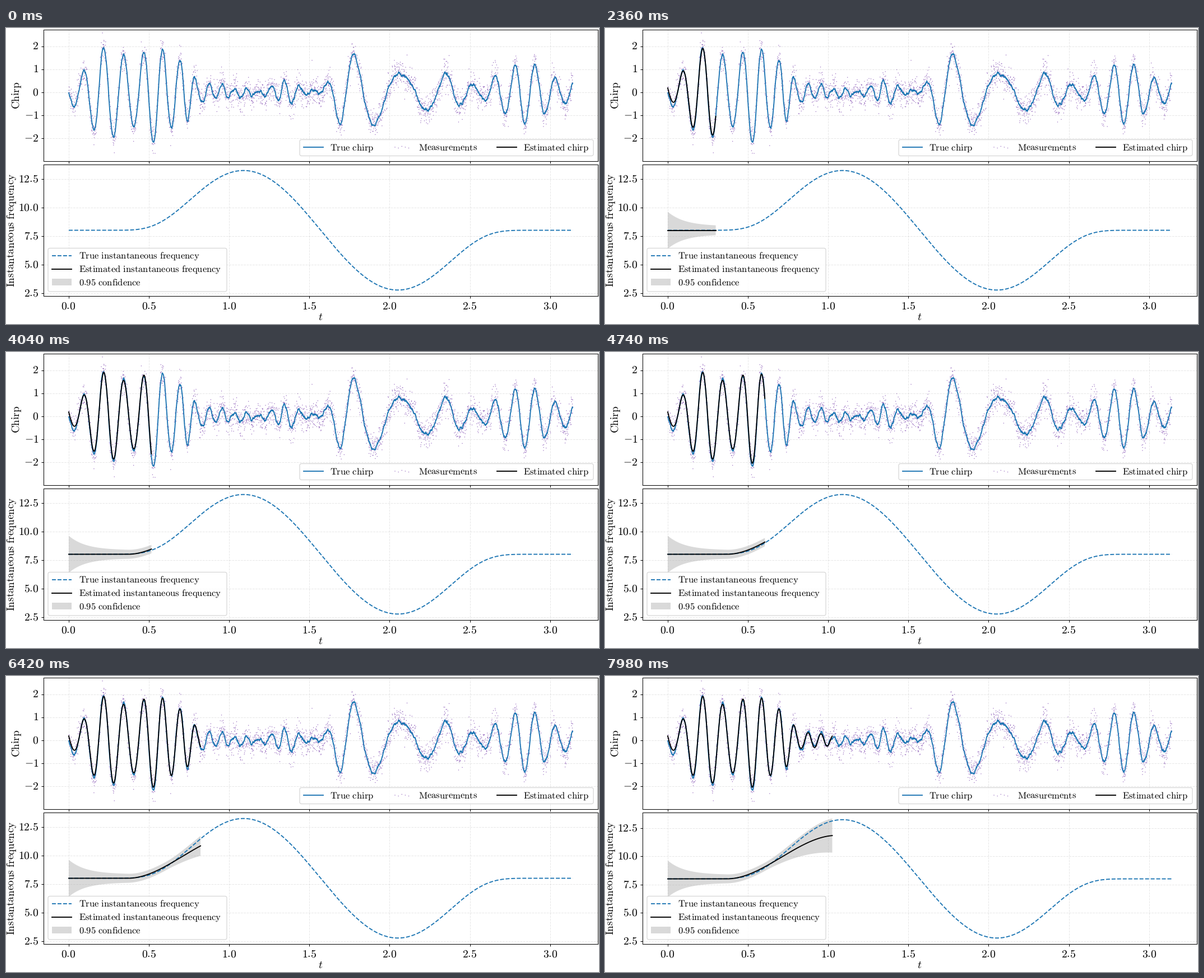
Write a matplotlib script that moves like this. It is 1058 by 529 pixels and loops after 8000 ms.

```python
import matplotlib.pyplot as plt
import numpy as np
from matplotlib.animation import FuncAnimation
from matplotlib.patches import FancyBboxPatch, Rectangle

W, H, DPI = 1058, 529, 100
PX = 72 / DPI                      # points per pixel
LEFT, RIGHT = 67, 1056
LINE, THIN = 1.88 * PX, .99 * PX
TICK_SIZE, LABEL_SIZE, LEGEND_SIZE = 19.7 * PX, 19.1 * PX, 16.6 * PX
BLUE, PURPLE, BLACK = "tab:blue", "tab:purple", "black"

plt.rcParams.update({"mathtext.fontset": "cm", "text.hinting": "none"})
rng = np.random.default_rng(7)


def smoothstep(x, start, end):
    s = np.clip((x - start) / (end - start), 0, 1)
    return s * s * (3 - 2 * s)


def eased(x, keys):
    """Ease from one (position, value) key to the next."""
    moves = zip(keys, keys[1:])
    return keys[0][1] + sum((y1 - y0) * smoothstep(x, x0, x1)
                            for (x0, y0), (x1, y1) in moves)


def jitter(size, sigma=.055, memory=.94):
    kicks = rng.normal(0, sigma * np.sqrt(1 - memory ** 2), size)
    out = np.zeros(size)
    for i in range(1, size):
        out[i] = memory * out[i - 1] + kicks[i]
    return out


def true_frequency(time):
    u = np.pi / 2 - time
    q = np.maximum(np.pi ** 2 / 4 - u ** 2, 1e-3)
    return 8 + 11.303 * np.sin(u) * np.exp(9.93 * (.2991 - q ** -1.5))


# The signal is a sine of the running phase under a wandering amplitude
AMPLITUDE = [(0, -.4), (.24, -2), (.4, -1.45), (.52, -2.1), (.7, -1.4),
             (.84, -.35), (1.2, -.12), (1.36, -.52), (1.53, 0), (1.76, 1.65),
             (1.88, 1.5), (2.12, .7), (2.34, .82), (2.54, .32), (2.86, 1.3),
             (3.08, .55)]

t = np.arange(1, 3142) / 1000
freq = true_frequency(t)
phase = 2 * np.pi * np.cumsum(freq) / 1000
clean = eased(t, AMPLITUDE) * np.sin(phase)
chirp = clean + jitter(len(t))
measured = chirp + rng.normal(0, .31, len(t))

chirp_estimate = .97 * clean + .22 * np.exp(-t / .02)
freq_estimate = 8 + 3.84 * smoothstep(t, .37, 1.05)
half_width = .36 + 1.275 * np.exp(-t / .105) + 1.22 * smoothstep(t, .6, 1.1)
lower, upper = freq_estimate - half_width, freq_estimate + half_width

fig = plt.figure(figsize=(W / DPI, H / DPI), dpi=DPI, facecolor="white")


def panel(top, bottom, yticks, y_format, x_labels):
    width, height = RIGHT - LEFT, bottom - top
    ax = fig.add_axes([LEFT / W, 1 - bottom / H, width / W, height / H])
    ax.set(xticks=[], yticks=[], xlim=(t[0] - .157, t[-1] + .157),
           ylim=(0, 1))
    for spine in ax.spines.values():
        spine.set_linewidth(THIN)
    across, along = ax.get_yaxis_transform(), ax.get_xaxis_transform()
    xticks = np.arange(0, 3.1, .5)
    grid = dict(colors="#b0b0b0", alpha=.3, linestyles="--",
                linewidths=THIN, zorder=1.5)
    ax.vlines(xticks, 0, 1, transform=along, **grid)
    ax.hlines(yticks, 0, 1, transform=across, **grid)
    tick = dict(ls="none", color=BLACK, ms=4.4 * PX, mew=THIN, clip_on=False)
    ax.plot(xticks, 0 * xticks, marker=3, transform=along, **tick)
    ax.plot([0] * len(yticks), yticks, marker=0, transform=across, **tick)
    for v in yticks:
        ax.text(-8.75 / width, v, f"${v:{y_format}}$", ha="right",
                va="center", size=TICK_SIZE, transform=across)
    for v in xticks if x_labels else []:
        ax.text(v, -8.5 / height, f"${v:.1f}$", ha="center", va="top",
                size=TICK_SIZE, transform=along)
    return ax


top = panel(3, 238, range(-2, 3), ".0f", False)
top.set_ylim(-2.985, 2.72)
top.scatter(t, measured, s=1, c=PURPLE, edgecolors="none")
top.plot(t, chirp, color=BLUE, lw=LINE)
chirp_line, = top.plot([], [], color=BLACK, lw=LINE)

low = panel(244, 479, np.arange(2.5, 13, 2.5), ".1f", True)
band, = low.fill([0, 0], [8, 8], color=BLACK, alpha=.15, lw=0)
low.plot(t, freq, color=BLUE, lw=LINE, ls="--")
freq_line, = low.plot([], [], color=BLACK, lw=LINE)

# Labels and legends, in stage pixels
stage = fig.add_axes([0, 0, 1, 1], facecolor="none")
stage.set(xlim=(0, W), ylim=(H, 0))
stage.axis("off")


def roman(s):
    return r"$\mathrm{" + s.replace(" ", r"\ ") + "}$"


def legend_box(x0, y0, x1, y1):
    stage.add_patch(FancyBboxPatch(
        (x0, y0), x1 - x0, y1 - y0, boxstyle="round,pad=0,rounding_size=3.5",
        fc="white", ec="#cccccc", alpha=.8, lw=1.25 * PX))


def legend_line(x, y, color, ls="-"):
    stage.plot([x, x + 35], [y, y], color=color, lw=LINE, ls=ls)


def legend_text(x, y, s):
    stage.text(x, y, roman(s), size=LEGEND_SIZE, va="baseline")


def side_label(x, y, s):
    stage.text(x, y, roman(s), size=LABEL_SIZE, rotation=90, ha="center",
               va="baseline", rotation_mode="anchor")


legend_box(524, 199.5, 1048, 228.5)
legend_line(531, 213, BLUE)
legend_text(578, 218.7, "True chirp")
stage.scatter(np.linspace(694, 718.5, 5), [213, 214.5, 211.5, 213, 214.5],
              s=1, c=PURPLE, edgecolors="none")
legend_text(736.5, 218.7, "Measurements")
legend_line(875.5, 213, BLACK)
legend_text(923, 218.7, "Estimated chirp")

legend_box(75, 393.5, 394, 471)
legend_line(82, 407, BLUE, "--")
legend_text(130, 412.3, "True instantaneous frequency")
legend_line(82, 431, BLACK)
legend_text(130, 436.4, "Estimated instantaneous frequency")
stage.add_patch(Rectangle((82, 448), 35, 12.3, fc=BLACK, alpha=.15, lw=0))
legend_text(130, 460.6, "0.95 confidence")

side_label(24, 120.5, "Chirp")
side_label(15.5, 361.5, "Instantaneous frequency")
stage.text(561.5, 522.8, "$t$", size=LABEL_SIZE, ha="center", va="baseline")


def update(frame):
    # Three advances every 140 ms: at 0, 20 and 120 ms
    cycle, beat = divmod(frame, 7)
    count = 3 * cycle + (beat >= 1) + (beat >= 6)
    k = max(6 * count, 1)
    shown = t[:k]
    chirp_line.set_data(shown, chirp_estimate[:k])
    freq_line.set_data(shown, freq_estimate[:k])
    band.set_xy(np.column_stack([np.r_[shown, shown[::-1]],
                                 np.r_[upper[:k], lower[:k][::-1]]]))
    bottom, peak = freq.min(), max(freq.max(), upper[:k].max())
    margin = .05 * (peak - bottom)
    low.set_ylim(bottom - margin, peak + margin)
    return chirp_line, freq_line, band


animation = FuncAnimation(fig, update, frames=400, interval=20, repeat=True,
                          repeat_delay=0, blit=False)
plt.show()
```
